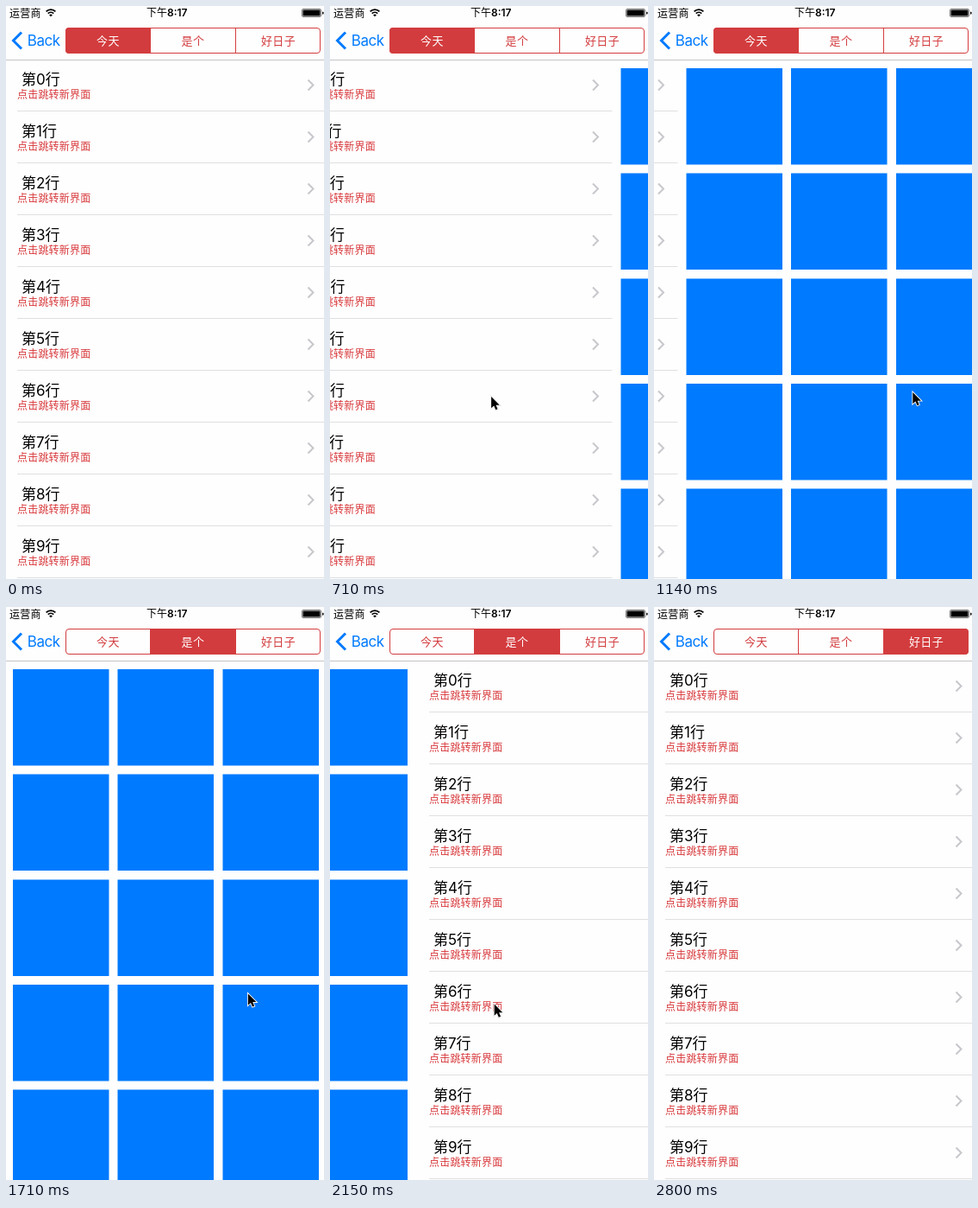
Animation, 369 px wide and 663 px high, one loop 3.58 s. Source, as an HTML page:

```html
<!DOCTYPE html>
<html lang="zh-CN">
<head>
<meta charset="utf-8">
<title>Paged tabs</title>
<style>
  html, body { margin: 0; width: 100%; height: 100%; overflow: hidden; background: #fefefe; }
  svg { display: block; width: 369px; height: 663px; }
  text { font-family: Inter, "Noto Sans CJK SC", "Noto Sans CJK", sans-serif; font-size: 17px; fill: #000; }
  .sub { font-size: 12px; letter-spacing: .2px; fill: #d8393c; }
  .tab { font-size: 13px; letter-spacing: .4px; text-anchor: middle; }
  .status { font-size: 12px; }
  .line { fill: none; stroke-linejoin: miter; }
</style>
</head>
<body>
<svg viewBox="0 0 369 663">
  <rect width="369" height="663" fill="#fefefe"/>
  <g id="pages"></g>
  <rect width="369" height="62" fill="#fefefe"/>
  <rect y="62" width="369" height="1" fill="#c4c4c6"/>

  <text class="status" x="4" y="12.5" letter-spacing=".2">运营商</text>
  <g class="line" stroke="#000" stroke-width="1.7">
    <path d="M46.6 6.4a7.6 7.6 0 0 1 10.8 0"/>
    <path d="M48.7 8.7a4.7 4.7 0 0 1 6.6 0"/>
  </g>
  <path d="M52 12.3l-1.9-1.9a2.7 2.7 0 0 1 3.8 0z"/>
  <text class="status" x="186.7" y="12.3" text-anchor="middle" font-weight="600"><tspan font-weight="500">下午</tspan>8:17</text>
  <rect x="343.5" y="3.5" width="22" height="9" rx="1.5" fill="none" stroke="#777"/>
  <rect x="344.5" y="4.5" width="20" height="7" rx=".5"/>
  <path d="M367 6.4a1.7 1.7 0 0 1 0 3.4z"/>

  <path class="line" d="M18 30.5L8.5 40L18 49.5" stroke="#007aff" stroke-width="3"/>
  <text x="24.8" y="46" letter-spacing="-.45" style="fill:#007aff">Back</text>

  <clipPath id="pill"><rect x="69" y="25" width="296" height="30" rx="4"/></clipPath>
  <g id="tabs" clip-path="url(#pill)"></g>
  <rect x="69.5" y="25.5" width="295" height="29" rx="3.5" fill="none" stroke="#d33c3e"/>

  <g id="cursor">
    <path d="M0 0V13.3L3.1 10.5L5.2 15.2L7.4 14.3L5.4 9.7H9.6Z"
      stroke="#fff" stroke-width="1.8" paint-order="stroke"
      style="filter:drop-shadow(.3px .8px .6px #0005)"/>
  </g>
</svg>
<script>
const LOOP = 3580, PAGE = 375, LEFT = -2, TOP = 62, RED = '#d33c3e';
const byId = id => document.getElementById(id);
const snap = v => Math.round(v * 2) / 2;

function add(parent, tag, attrs, label) {
  const el = document.createElementNS('http://www.w3.org/2000/svg', tag);
  for (const key in attrs) el.setAttribute(key, attrs[key]);
  if (label) el.textContent = label;
  parent.append(el);
  return el;
}

function addPage(index) {
  return add(byId('pages'), 'g', { transform: `translate(${LEFT + index * PAGE} ${TOP})` });
}

function addTable(index) {
  const page = addPage(index);
  for (let i = 0; i < 10; i++) {
    const row = add(page, 'g', { transform: `translate(0 ${i * 60})` });
    add(row, 'text', { x: 20, y: 29 }, `第${i}行`);
    add(row, 'text', { x: 15, y: 45, class: 'sub' }, '点击跳转新界面');
    add(row, 'path', { d: 'M352.5 23.5l6 6l-6 6', class: 'line', stroke: '#c7c7cc', 'stroke-width': 2 });
    add(row, 'rect', { x: 15, y: 59, width: PAGE - 15, height: 1, fill: '#e0e0e2' });
  }
}

function addGrid(index) {
  const page = addPage(index), gap = 10, size = (PAGE - 4 * gap) / 3;
  for (let i = 0; i < 15; i++) {
    add(page, 'rect', {
      x: snap(gap + (i % 3) * (size + gap)),
      y: snap(gap + Math.floor(i / 3) * (size + gap)),
      width: snap(size), height: snap(size), fill: '#007aff'
    });
  }
}

addTable(0);
addGrid(1);
addTable(2);

const edge = i => 69 + Math.floor(i * 296 / 3);
const tabs = ['今天', '是个', '好日子'].map((label, i) => {
  const x = edge(i), width = edge(i + 1) - x + 1;
  return {
    box: add(byId('tabs'), 'rect', { x, y: 25, width, height: 30 }),
    text: add(byId('tabs'), 'text', { x: x + width / 2, y: 44.8, class: 'tab' }, label)
  };
});
for (const i of [1, 2]) add(byId('tabs'), 'rect', { x: edge(i), y: 25, width: 1, height: 30, fill: RED });

// Smooth monotone curve through [time, value] keys, held at both ends.
function track(keys) {
  const rise = i => keys[i + 1] && keys[i] ? (keys[i + 1][1] - keys[i][1]) / (keys[i + 1][0] - keys[i][0]) : 0;
  const slope = i => {
    const a = rise(i - 1), b = rise(i);
    return a * b > 0 ? 2 * a * b / (a + b) : 0;
  };
  return time => {
    const i = keys.findLastIndex(key => key[0] <= time);
    if (i < 0) return keys[0][1];
    if (i === keys.length - 1) return keys[i][1];
    const [t0, v0] = keys[i], [t1, v1] = keys[i + 1];
    const span = t1 - t0, u = (time - t0) / span, w = 1 - u;
    return v0 + (v1 - v0) * u * u * (3 - 2 * u) + span * u * w * (slope(i) * w - slope(i + 1) * u);
  };
}

// Two swipes, each followed by a settle onto the next page.
const scrollAt = track([
  [560, 0], [710, 45], [1140, 345], [1320, 375],
  [1710, 375], [1920, 510], [2270, 707.5], [2390, 750]
]);
const cursorX = track([
  [60, 372], [230, 316], [530, 316], [710, 187.7], [820, 135], [1140, 300.3],
  [1650, 300.3], [1710, 281.3], [1920, 135], [2020, 110], [2270, 260.5], [2680, 260.5], [2800, 372]
]);
const cursorY = track([
  [60, 457], [230, 452.5], [710, 452], [1140, 447], [1920, 447.7], [2270, 463.7], [2680, 463.7], [2800, 492]
]);

function draw(now) {
  const time = now % LOOP, scroll = scrollAt(time);
  byId('pages').setAttribute('transform', `translate(${-snap(scroll)} 0)`);
  byId('cursor').setAttribute('transform', `translate(${cursorX(time)} ${cursorY(time)})`);
  // a tab lights up only once its page has settled
  const active = Math.floor(scroll / PAGE);
  tabs.forEach((tab, i) => {
    tab.box.setAttribute('fill', i === active ? RED : '#fefefe');
    tab.text.style.fill = i === active ? '#fff' : RED;
  });
}

const start = performance.now();
function tick() {
  draw(performance.now() - start);
  requestAnimationFrame(tick);
}
tick();
</script>
</body>
</html>
```
